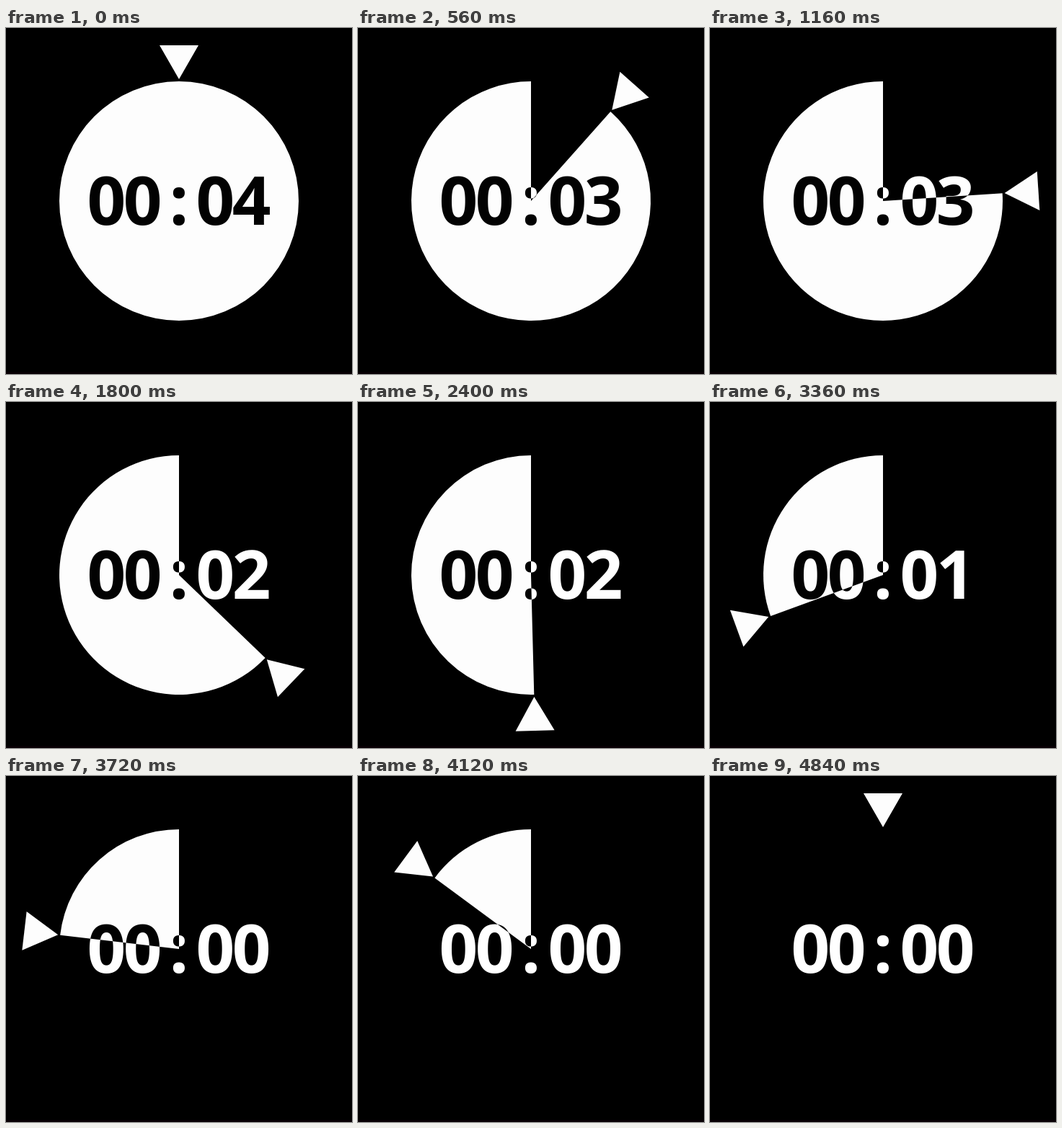
An HTML page that plays this animation: 480 px wide and 480 px high, repeating every 4.88 s.

```html
<!DOCTYPE html>
<html lang="en">
<head>
<meta charset="utf-8">
<title>Countdown</title>
<style>
  html, body { margin: 0; width: 100%; height: 100%; overflow: hidden; background: #000; }
  svg { display: block; width: 100%; height: 100%; isolation: isolate; }
  text {
    font: 700 94px "Open Sans", "Noto Sans", sans-serif;
    text-anchor: middle;
    fill: #fff;
    mix-blend-mode: difference;
  }
</style>
</head>
<body>
<svg viewBox="0 0 480 480">
  <rect width="480" height="480"/>
  <rect y="477" width="480" height="3" fill="#080004"/>
  <path id="pie" fill="#fdfdfd"/>
  <path id="hand" d="M213 24H267L240 71Z" fill="#fdfdfd"/>
  <text id="clock" x="139.4 189.7 240 290.3 340.6" y="273">00:04</text>
</svg>
<script>
  const STEP = 40, LAST = 121, SECONDS = 4;
  const C = 240, R = 166;
  const [pie, hand, clock] = ["pie", "hand", "clock"].map(id => document.getElementById(id));
  let shown = -1;

  // Point on the rim, in degrees clockwise from the top
  function rim(deg) {
    const a = deg * Math.PI / 180;
    return `${(C + R * Math.sin(a)).toFixed(3)} ${(C - R * Math.cos(a)).toFixed(3)}`;
  }

  function draw(step) {
    const angle = 360 * step / LAST;
    const left = Math.floor(SECONDS * (1 - step / LAST));
    // Two arcs, so that the full disc is a valid path too
    const arc = deg => `A${R} ${R} 0 0 1 ${rim(deg)}`;
    pie.setAttribute("d", step < LAST
      ? `M${C} ${C}L${rim(angle)}${arc((angle + 360) / 2)}${arc(360)}Z`
      : "");
    hand.setAttribute("transform", `rotate(${angle} ${C} ${C})`);
    clock.textContent = "00:" + String(left).padStart(2, "0");
  }

  function tick(now) {
    const step = Math.floor(now / STEP) % (LAST + 1);
    if (step !== shown) draw(shown = step);
    requestAnimationFrame(tick);
  }

  draw(0);
  requestAnimationFrame(tick);
</script>
</body>
</html>
```
